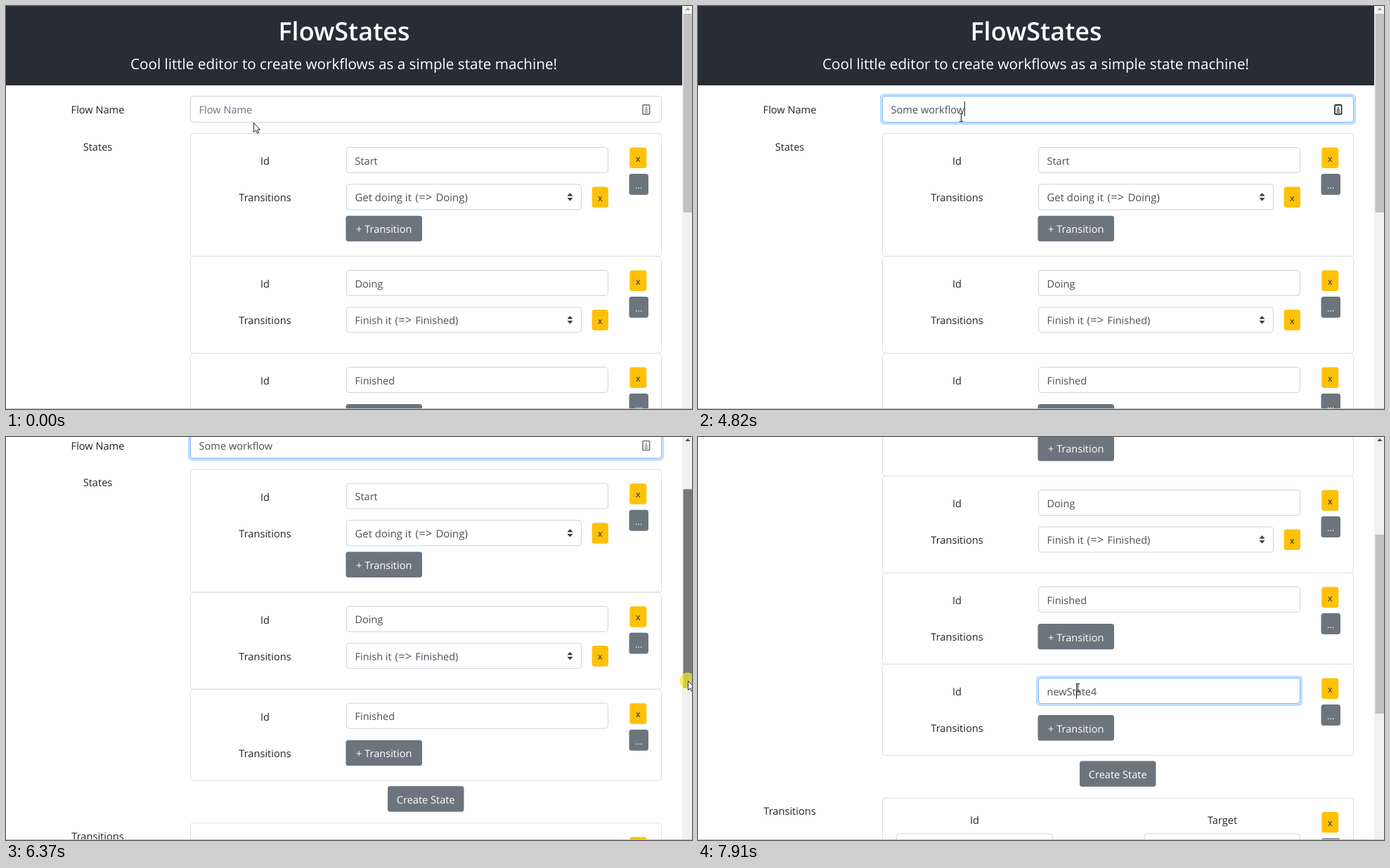
An HTML page that plays this animation: 976 by 574 pixels, repeating every 8 s.

```html
<!DOCTYPE html>
<html lang="en">
<head>
<meta charset="utf-8">
<title>FlowStates</title>
<style>
  html, body { margin: 0; width: 100%; height: 100%; overflow: hidden; background: #fefefe; }
  svg { display: block; }
  text { font-family: "Open Sans", "Noto Sans", sans-serif; fill: #212529; white-space: pre; text-rendering: geometricPrecision; }
  .mid { text-anchor: middle; }
  .value { fill: #495057; }
  .light { fill: #fff; }
</style>
</head>
<body>
<svg id="stage" width="976" height="574" viewBox="0 0 976 574"></svg>
<script>
const LOOP = 8000;
const GREY = "#6c757d", YELLOW = "#ffc107";

// Markup helpers
const text = (x, y, s, cls = "", size = 14.6, extra = "") =>
  `<text x="${x}" y="${y}" class="${cls}" font-size="${size}" ${extra}>${s.replace(/>/g, "&gt;")}</text>`;
const label = (x, y, s) => text(x, y, s, "mid");
const box = (x, y, w, h, stroke, fill = "#fff", extra = "") =>
  `<rect x="${x + .5}" y="${y + .5}" width="${w - 1}" height="${h - 1}" rx="4" fill="${fill}" stroke="${stroke}" ${extra}/>`;
const field = (x, y, w, value = "", size, h = 37) =>
  box(x, y, w, h, "#ced4da") + text(x + 12.5, y + 24.5, value, "value", size);
const card = (y, h) => box(262, y, 671, h + 1, "#dfdfdf", "none");
const block = (x, y, w, h, fill, extra = "") =>
  `<rect x="${x}" y="${y}" width="${w}" height="${h}" rx="3.5" fill="${fill}" ${extra}/>`;
const button = (x, y, w, s, extra) =>
  block(x, y, w, 36.5, GREY, extra) + text(x + w / 2, y + 24.5, s, "mid light");
const removeButton = (x, y, w) => block(x, y, w, 29.5, YELLOW) + text(x + w / 2, y + 20, "x", "mid", 12.6);
const sideButtons = y => removeButton(887.3, y, 24) +
  block(886.5, y + 37.5, 27.5, 30, GREY) + text(900.2, y + 58.5, "...", "mid light", 12.8);
const sorter = (x, y) =>
  `<path d="M${x - 4} ${y - 1.5}l4-4.5 4 4.5zM${x - 4} ${y + 1}h8l-4 4.5z" fill="#343a40"/>`;
const focusRing = (id, x, y, w, h) => `<g id="${id}">` +
  box(x - 2, y - 2, w + 4, h + 4, "#bfdeff", "none", 'stroke-width="3"') +
  box(x, y, w, h, "#80bdff", "none") + "</g>";
const caretLine = (id, x, y) => `<rect id="${id}" x="${x}" y="${y}" width="1" height="21" fill="#222"/>`;

// A chosen option such as "Finish it (=> Finished)", laid out in chunks
function select(y, name, target, arrowX, size) {
  return box(484, y, 335, 37, "#ced4da") + text(496.5, y + 24.5, name, "value", size) +
    text(arrowX, y + 24.5, "(", "value") + text(arrowX + 4.8, y + 24.5, "=>", "value", 16.5) +
    text(arrowX + 29, y + 24.5, target + ")", "value", size) +
    sorter(802.5, y + 18.8) + removeButton(833.7, y + 4, 23.3);
}

function stateCard(y, h, id, body) {
  return card(y, h) + label(368.5, y + 45, "Id") + field(484, y + 20, 373, id, 14.5) +
    label(368.5, y + 97, "Transitions") + sideButtons(y + 20.5) + body;
}

const addTransition = y => button(483.5, y, 108.5, "+ Transition");

const page = `
  <rect width="962" height="113" fill="#282c34"/>
  ${text(481, 48.5, "FlowStates", "mid light", 36, 'font-weight="600"')}
  ${text(480.5, 89.5, "Cool little editor to create workflows as a simple state machine!", "mid light", 20.7)}
  ${label(130.5, 153, "Flow Name")}
  ${field(262, 128, 671, "", 14.6, 38)}
  ${focusRing("nameRing", 262, 128, 671, 38)}
  ${text(274.5, 153, "", "value", 14.6, 'id="name"')}
  ${caretLine("nameCaret", 275, 136)}
  <g id="cardIcon" fill="none" stroke="#333" stroke-width="1.8">
    <rect x="906" y="141" width="9.6" height="13" rx="1"/>
    <path d="M910.8 143.5v3.5M908.6 148.2h4.4M908.3 151h5" stroke-width="1.5"/>
  </g>
  ${label(130.5, 205.5, "States")}
  ${stateCard(181, 175, "Start", select(253.5, "Get doing it", "Doing", 582.5, 14.9) + addTransition(298.7))}
  ${stateCard(356, 138, "Doing", select(428.5, "Finish it", "Finished", 553.5, 14.5))}
  ${stateCard(494, 130, "Finished", addTransition(567))}
  <g id="newCard">
    ${stateCard(624, 130, "newState4", addTransition(697))}
    ${focusRing("newRing", 484, 644, 373, 37)}
    ${caretLine("newCaret", 538, 653)}
  </g>
  <g id="lower">
    ${block(541.5, 631, 111.5, 39.5, "none", 'id="createRing" stroke="#b5babe" stroke-width="3"')}
    ${button(543, 632.5, 108.5, "Create State", 'id="create"')}
    ${label(130.5, 709, "Transitions")}
    ${card(684.5, 171)}
    ${label(393.5, 722, "Id")}
    ${label(746, 722, "Target")}
    ${field(282, 735.5, 223, "Get doing it", 14.9)}
    ${text(570, 754, "=>", "mid", 16.5)}
    ${field(634.5, 735.5, 222.5, "Doing", 15)}
    ${sorter(840.5, 754.5)}
    ${label(393.7, 813.5, "Source(s):")}
    <circle cx="544" cy="809.5" r="2.8" fill="#212529"/>
    ${text(557, 814, "Start", "", 14.4)}
    ${sideButtons(705)}
    ${card(855.5, 171)}
  </g>`;

document.getElementById("stage").innerHTML = `
  <rect width="976" height="574" fill="#fefefe"/>
  <g id="page">${page}</g>
  <rect x="962" width="14" height="574" fill="#f1f1f1"/>
  <path id="upArrow" d="M966.3 6l3.7-4 3.7 4z"/>
  <rect id="thumb" x="963.5" width="12.5"/>
  <rect y="573" width="976" height="1" fill="#c4c4c4"/>
  <circle id="press" r="11.5" fill="#f5ee31" opacity=".7"/>
  <path id="arrow" d="M.5.5v13l3-2.7 2 4.4 2-.9-2-4.3h4z" fill="#fff" stroke="#111" stroke-width=".9"/>
  <path id="beam" d="M-2.5-5.5h2l.5.5.5-.5h2M0-5V5M-2.5 5.5h2L0 5l.5.5h2" fill="none" stroke="#111"/>`;

const el = id => document.getElementById(id);
const show = (id, on) => el(id).setAttribute("opacity", Number(on));
const set = (id, attrs) => {
  for (const key in attrs) el(id).setAttribute(key, attrs[key]);
};

// Timelines: each entry holds from its time until the next one
const typing = [[1210, ""], [1550, "S"], [2410, "So"], [2580, "Some"], [2750, "Some "],
  [3270, "Some w"], [3440, "Some wo"], [3610, "Some wor"], [3960, "Some work"],
  [4470, "Some workf"], [4640, "Some workflo"], [4820, "Some workflow"]];
const pointer = [[0, 352, 166, "arrow"], [180, 374, 159, "beam"],
  [5160, 402, 164, "beam"], [5330, 515, 192, "arrow"], [5500, 690, 232, "arrow"],
  [5680, 850, 262, "arrow"], [5850, 948, 274, "arrow"], [6030, 973, 272, "arrow"],
  [6190, 973, 302, "arrow"], [6370, 970, 347, "arrow"], [6540, 962, 390, "arrow"],
  [6710, 956, 414, "arrow"], [6880, 880, 402, "arrow"], [7060, 700, 366, "arrow"],
  [7230, 606, 350, "arrow"], [7400, 600, 354, "beam"], [7570, 570, 358, "beam"],
  [7740, 540, 357, "beam"]];
const scrolling = [[0, 0], [6190, 45], [6370, 135.3], [6540, 235], [6710, 301]];
const at = (list, t) => list.filter(entry => entry[0] <= t).pop();
const within = (t, from, to) => t >= from && t < to;

function render(t) {
  const scroll = at(scrolling, t)[1];
  const added = t >= 7400;
  set("page", { transform: `translate(0 ${-scroll})` });
  set("lower", { transform: `translate(0 ${added ? 130 : 0})` });

  // Flow name field
  const [typedAt, typed] = at(typing, t) || [0, ""];
  const name = el("name");
  name.textContent = typed || "Flow Name";
  name.style.fill = typed ? "#495057" : GREY;
  const width = typed ? name.getComputedTextLength() : 0;
  set("nameCaret", { x: Math.round(274.5 + width) });
  show("nameCaret", within(t, 1210, 7230) && Math.floor((t - typedAt) / 515) % 2 === 0);
  show("nameRing", within(t, 1040, 1210) ? .5 : within(t, 1210, 7230));
  show("cardIcon", within(t, 180, 5330) ? 1 : .6);

  // New state and its button
  show("newCard", added);
  show("newRing", within(t, 7740, 7910) ? .5 : t >= 7910);
  show("newCaret", t >= 7740);
  show("createRing", within(t, 7230, 7740));
  set("create", { fill: within(t, 7230, 7400) ? "#5a6268" : GREY });

  // Scrollbar
  const dragging = within(t, 6190, 6880);
  set("thumb", {
    y: 11 + scroll * (added ? 128 : 141) / 301,
    height: added ? 255 : 283,
    fill: dragging ? "#787878" : within(t, 6030, 6190) ? "#a8a8a8" : "#c1c1c1"
  });
  set("upArrow", { fill: scroll ? "#505050" : "#a3a3a3" });

  // Pointer
  const [, x, y, shape] = at(pointer, t);
  for (const id of ["arrow", "beam"]) {
    set(id, { transform: `translate(${x + (id === "beam" ? .5 : 0)} ${y})` });
    show(id, id === shape);
  }
  set("press", { cx: x, cy: y, opacity: dragging || within(t, 7230, 7400) ? .7 : 0 });
}

const start = performance.now();
function tick() {
  render((performance.now() - start) % LOOP);
  requestAnimationFrame(tick);
}
tick();
</script>
</body>
</html>
```
